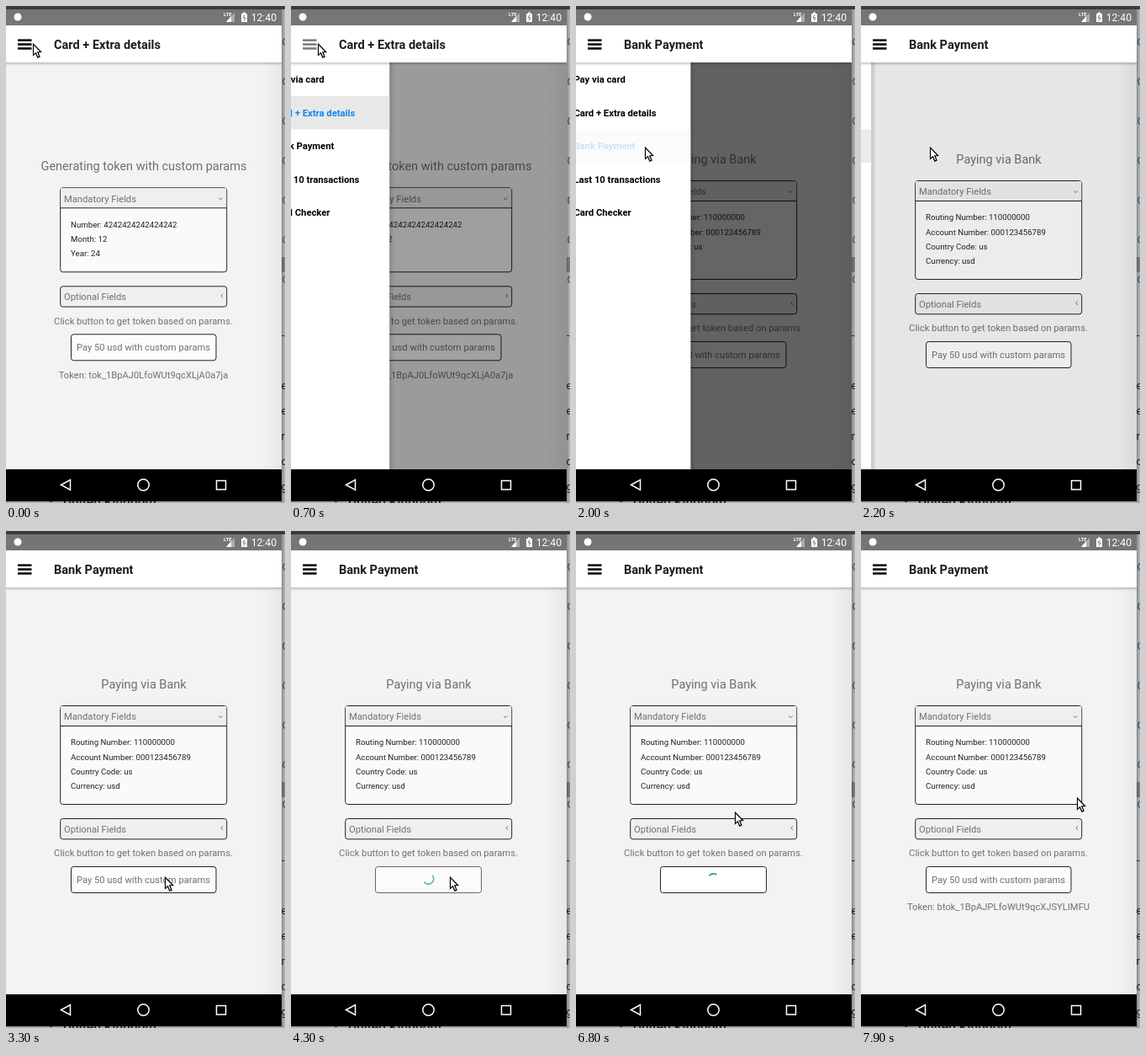
An HTML page with a canvas that plays this animation: 332 by 590 pixels, repeating every 8000 ms.

```html
<!DOCTYPE html>
<html lang="en">
<head>
<meta charset="utf-8">
<title>Payment app</title>
<style>
html, body { margin: 0; overflow: hidden; }
canvas { display: block; width: 332px; height: 590px; }
</style>
</head>
<body>
<canvas id="stage" width="332" height="590"></canvas>
<script>
const ctx = document.getElementById('stage').getContext('2d');
const LOOP = 8000, STEP = 100;
const WIDTH = 328, TOP = 67, NAV = 550, DRAWER = 160;
const GREY = '#707070', INK = '#222', HEAD_FILL = '#efefef';

// Moments of the story, in ms
const OPEN = 554, PICK = 2000, CLOSE = 1962, PAY = 4150, LOAD = 4200, DONE = 7600;

const pages = {
  card: {
    title: 'Card + Extra details', heading: 'Generating token with custom params',
    top: 215.8, bottom: 315.8, token: 'tok_1BpAJ0LfoWUt9qcXLjA0a7ja',
    fields: ['Number: 4242424242424242', 'Month: 12', 'Year: 24']
  },
  bank: {
    title: 'Bank Payment', heading: 'Paying via Bank',
    top: 207.5, bottom: 324.5, token: 'btok_1BpAJPLfoWUt9qcXJSYLIMFU',
    fields: ['Routing Number: 110000000', 'Account Number: 000123456789', 'Country Code: us', 'Currency: usd']
  }
};
const menu = ['Pay via card', 'Card + Extra details', 'Bank Payment', 'Last 10 transactions', 'Card Checker'];

// Cursor moves: from time, to time, x, y
const moves = [
  [700, 1100, 82, 156], [1200, 1400, 82, 184], [1500, 1800, 82, 167], [2200, 2600, 173, 322],
  [2700, 3100, 189, 410], [5700, 6300, 189, 333], [7500, 7900, 257, 316]
];

const clamp = v => Math.min(1, Math.max(0, v));
const smooth = v => (v = clamp(v), v * v * (3 - 2 * v));
const mix = (a, b, f) => a + (b - a) * f;
const spring = ms => ms <= 0 ? 0 : 1 - (1 + 0.0178 * ms) * Math.exp(-0.0178 * ms);
// Opacity of a touched control: fades down to 0.2 at the peak and back
const press = (t, peak) => mix(0.2, 1, clamp(t < peak ? (peak - t) / 200 : (t - peak) / 250));

function rect(x, y, w, h, color) {
  ctx.fillStyle = color;
  ctx.fillRect(x, y, w, h);
}

function text(str, x, y, size, color, align = 'left', weight = 400) {
  ctx.font = `${weight} ${size}px Roboto, sans-serif`;
  ctx.textAlign = align;
  ctx.fillStyle = color;
  ctx.fillText(str, x, y + size * 0.355);
}

function box(x, y, w, h, fill) {
  ctx.beginPath();
  ctx.roundRect(x, y, w, h, 3);
  ctx.fillStyle = fill;
  ctx.fill();
  ctx.strokeStyle = INK;
  ctx.lineWidth = 1;
  ctx.stroke();
}

function line(points, color, width = 1, close = false) {
  ctx.beginPath();
  points.forEach(p => ctx.lineTo(...p));
  if (close) ctx.closePath();
  ctx.strokeStyle = color;
  ctx.lineWidth = width;
  ctx.stroke();
}

function shade(x, y, w, h, dx, dy, from, to) {
  const g = ctx.createLinearGradient(x, y, x + dx, y + dy);
  g.addColorStop(0, `rgba(0,0,0,${from})`);
  g.addColorStop(1, `rgba(0,0,0,${to})`);
  rect(x, y, w, h, g);
}

function faded(alpha, draw) {
  ctx.save();
  ctx.globalAlpha = alpha;
  draw();
  ctx.restore();
}

// The page behind the phone window
function backdrop() {
  rect(0, 0, 332, 590, '#c6c6c6');
  for (let i = 0; i < 7; i++) text('O', 328.5, 42 + 47 * i, 13, '#16658c');
  rect(WIDTH, 298, 4, 18, '#8a8a8a');
  text('-2', 328, 390, 13, INK);
  [...'eercg'].forEach((s, i) => text(s, 327.5, 450 + 30 * i, 13, INK));
  shade(WIDTH, 0, 4, 590, 4, 0, 0.3, 0.08);
  shade(0, 587, WIDTH, 3, 0, 3, 0.3, 0.1);
  text('•', 51, 588, 15, INK);
  text('United Kingdom', 68, 588, 15.5, INK, 'left', 500);
}

function statusBar() {
  rect(0, 0, 332, 4, '#3d3c38');
  rect(0, 4, WIDTH, 19, '#757575');
  ctx.fillStyle = '#fff';
  ctx.beginPath();
  ctx.arc(14, 13, 4.5, 0, 7);
  ctx.fill();
  text('LTE', 259, 10, 6, '#fff', 'left', 700);
  for (const [x, alpha] of [[272, 0.4], [268, 1]]) faded(alpha, () => {
    ctx.fillStyle = '#fff';
    ctx.beginPath();
    [[x, 280 - x], [x, 19], [262, 19]].forEach(p => ctx.lineTo(...p));
    ctx.fill();
  });
  rect(280, 9, 7, 10, '#fff');
  rect(282, 7.5, 3, 2, '#fff');
  line([[284, 10.5], [282, 14], [285, 14], [283, 17.5]], '#757575');
  text('12:40', 322, 13.5, 12.2, '#fff', 'right');
}

function header(title, t) {
  rect(0, 23, WIDTH, TOP - 23, '#fff');
  shade(0, TOP, WIDTH, 4, 0, 4, 0.22, 0);
  faded(press(t, 600), () => {
    for (let i = 0; i < 3; i++) rect(14, 39.4 + 4.9 * i, 16.5, 2.5, '#000');
  });
  text(title, 57, 46, 14.55, '#1c1c1c', 'left', 700);
}

function spinner(t) {
  const d = t - 5600, c = ((d + 378) / 1333 % 1 + 1) % 1;
  const turn = (70 + d * 0.108) / 360 + 0.25 * c;
  const start = turn + 0.75 * smooth(c * 2 - 1);
  const end = turn + 0.75 * smooth(c * 2) + 0.02;
  ctx.beginPath();
  ctx.arc(163.5, 413, 6.2, start * 2 * Math.PI, end * 2 * Math.PI);
  ctx.strokeStyle = '#1a9482';
  ctx.lineWidth = 1.6;
  ctx.stroke();
}

function content(page, t) {
  const { top, bottom } = page;
  rect(0, TOP, WIDTH, NAV - TOP, '#f3f3f3');
  shade(304, TOP, 24, NAV - TOP, 24, 0, 0, 0.05);
  text(page.heading, 164, top - 25.9, 14.5, GREY, 'center');

  box(64.7, top, 198, bottom - top, '#fafafa');
  rect(65.2, top + 0.5, 197, 23, HEAD_FILL);
  line([[64.7, top + 24], [262.7, top + 24]], INK);
  text('Mandatory Fields', 69, top + 13, 11.2, GREY);
  line([[253, top + 12], [255.3, top + 14], [257.6, top + 12]], GREY);
  page.fields.forEach((s, i) => text(s, 77, top + 43.5 + i * 17.1, 9.7, INK));

  box(64.7, bottom + 17, 198, 24.3, HEAD_FILL);
  text('Optional Fields', 69, bottom + 29.5, 11.2, GREY);
  line([[258, bottom + 26], [256, bottom + 28.3], [258, bottom + 30.6]], GREY);
  text('Click button to get token based on params.', 163.5, bottom + 58, 11.2, GREY, 'center');

  faded(press(t, PAY), () => {
    if (t >= LOAD && t < DONE) {
      box(100.5, bottom + 74, 126, 31, '#fff');
      spinner(t);
    } else {
      box(77.5, bottom + 74, 172.5, 31, '#fcfcfc');
      text('Pay 50 usd with custom params', 163.5, bottom + 89.5, 11.2, GREY, 'center');
    }
  });
  if (page === pages.card || t >= DONE)
    text('Token: ' + page.token, 163.5, bottom + 122, 11.2, GREY, 'center');
}

function drawer(edge, active, t) {
  const left = edge - DRAWER;
  shade(edge, TOP, 6, NAV - TOP, 6, 0, 0.16, 0);
  rect(left, TOP, DRAWER, NAV - TOP, '#fff');
  menu.forEach((label, i) => {
    const y = 87.5 + i * 39.5, on = label === active;
    faded(on ? press(t, PICK) ** (t >= PICK) : 1, () => {
      if (on) rect(left, y - 20, DRAWER, 39.5, '#e8e8e8');
      text(label, left + 21, y, 11.25, on ? '#0e86f5' : '#000', 'left', 700);
    });
  });
}

function navBar() {
  rect(0, NAV, WIDTH, 588 - NAV, '#000');
  line([[65.5, 568.5], [76.5, 562.5], [76.5, 574.5]], '#fff', 1.5, true);
  ctx.beginPath();
  ctx.arc(163.5, 568.5, 6.7, 0, 7);
  ctx.stroke();
  ctx.strokeRect(250.5, 563.5, 11, 10.5);
}

function cursor(t) {
  let x = 32, y = 44;
  for (const [from, to, toX, toY] of moves) {
    const f = smooth((t - from) / (to - from));
    x = mix(x, toX, f);
    y = mix(y, toY, f);
  }
  ctx.save();
  ctx.translate(Math.round(x) + 0.5, Math.round(y) + 1.3);
  line([[0, 0], [0, 13], [3, 10.3], [5.3, 15.7], [7.4, 14.8], [5.2, 9.5], [9, 9.3]], '#000', 1.1, true);
  ctx.fillStyle = '#fff';
  ctx.fill();
  ctx.stroke();
  ctx.restore();
}

function render(t) {
  const picked = t >= PICK;
  const page = picked ? pages.bank : pages.card;
  const open = picked ? 1 - spring(t - CLOSE) : spring(t - OPEN);
  const edge = DRAWER * open;
  const dim = 0.7 * open ** (picked ? 1 : 2.1);

  ctx.clearRect(0, 0, 332, 590);
  backdrop();
  content(page, t);
  rect(0, TOP, WIDTH, NAV - TOP, `rgba(0,0,0,${dim})`);
  if (edge > 0.5) drawer(edge, page.title, t);
  header(page.title, t);
  statusBar();
  navBar();
  cursor(t);
}

const began = performance.now();
function tick() {
  const t = (performance.now() - began) % LOOP;
  render(Math.floor(t / STEP) * STEP);
  requestAnimationFrame(tick);
}
tick();
</script>
</body>
</html>
```
